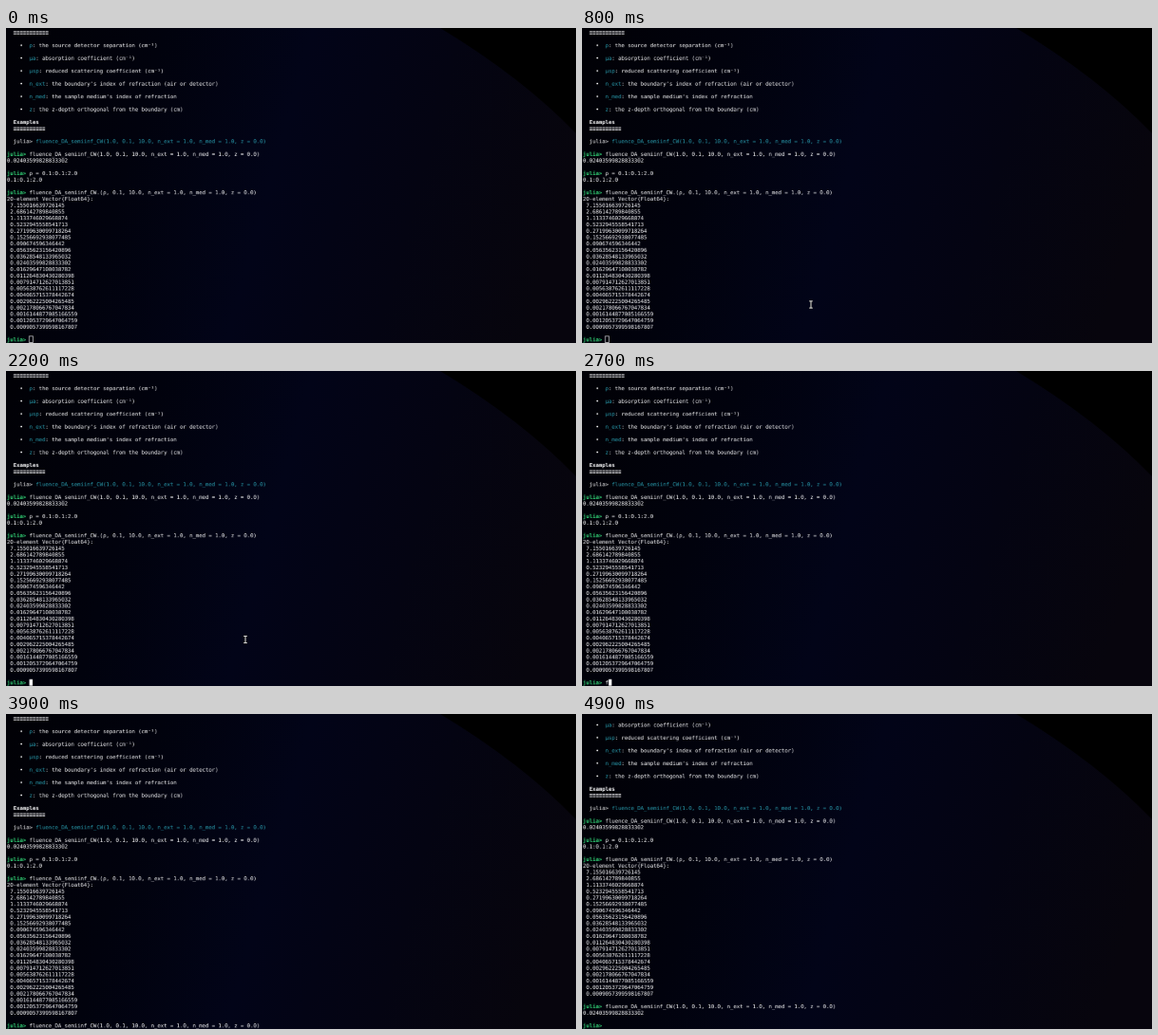
Animation of 600x332 px, one loop 5000 ms. Source, as an HTML page with a canvas:

```html
<!DOCTYPE html>
<html lang="en">
<head>
<meta charset="utf-8">
<title>Julia terminal</title>
<style>
  html, body { margin: 0; width: 100%; height: 100%; overflow: hidden; background: #000; }
  canvas { display: block; }
</style>
</head>
<body>
<canvas id="stage" width="600" height="332"></canvas>
<script>
const stage = document.getElementById('stage').getContext('2d');
const LOOP = 5000, BLINK = 600, FOCUS = 900;
// The terminal is drawn with 8 by 16 cells and then scaled down.
const COL = 8, ROW = 16, BASELINE = 13.2, ZOOM = 0.4214, LEFT = 1, TOP = 1.3;
const SIZE = 13.29, FAMILY = '"DejaVu Sans Mono", monospace';
const WHITE = '#fff', CYAN = '#2aa1b3', GREEN = '#33da7a', DARK = '#03050f';

const screen = document.createElement('canvas');
screen.width = Math.ceil(stage.canvas.width / ZOOM);
screen.height = Math.ceil(stage.canvas.height / ZOOM);
const term = screen.getContext('2d');

// Photon fluence at distance rho on a semi-infinite medium (diffusion approximation).
function fluence(rho, absorption = 0.1, scattering = 10) {
  const D = 1 / (3 * scattering), decay = Math.sqrt(3 * absorption * scattering);
  const depth = 1 / scattering, boundary = 2 * D;
  const source = z => {
    const r = Math.sqrt(rho * rho + z * z);
    return Math.exp(-decay * r) / r;
  };
  return (source(depth) - source(2 * boundary + depth)) / (4 * Math.PI * D);
}

// A line is a list of [text, colour, bold] runs.
const plain = text => [[text, WHITE]];
const bold = text => [[text, WHITE, true]];
const prompt = (code = '') => [['julia> ', GREEN, true], [code, WHITE]];
const item = (name, text) => [['    •  ', WHITE], [name, CYAN], [': ' + text, WHITE]];
const blank = plain('');

const args = '0.1, 10.0, n_ext = 1.0, n_med = 1.0, z = 0.0)';
const single = 'fluence_DA_semiinf_CW(1.0, ' + args;
const dotted = 'fluence_DA_semiinf_CW.(ρ, ' + args;
const result = plain(String(fluence(1)));
const values = Array.from({ length: 20 }, (_, i) => plain(' ' + fluence((i + 1) / 10)));

const history = [
  bold('  ' + '≡'.repeat(11)), blank,
  item('ρ', 'the source detector separation (cm⁻¹)'), blank,
  item('μa', 'absorption coefficient (cm⁻¹)'), blank,
  item('μsp', 'reduced scattering coefficient (cm⁻¹)'), blank,
  item('n_ext', "the boundary's index of refraction (air or detector)"), blank,
  item('n_med', "the sample medium's index of refraction"), blank,
  item('z', 'the z-depth orthogonal from the boundary (cm)'), blank,
  bold('  Examples'), bold('  ' + '≡'.repeat(10)), blank,
  [['  julia> ', WHITE], [single, CYAN]], blank,
  prompt(single), result, blank,
  prompt('ρ = 0.1:0.1:2.0'), plain('0.1:0.1:2.0'), blank,
  prompt(dotted), plain('20-element Vector{Float64}:'), ...values, blank
];
const finished = [...history.slice(3), prompt(single), result, blank];

// Each key press (or the focus click) restarts the caret blink.
const steps = [
  { at: 0, input: '', caret: 0 },
  { at: FOCUS, input: '', caret: 0 },
  { at: 2400, input: 'f', caret: 1 },
  { at: 2900, input: dotted, caret: 1 },
  { at: 3300, input: single, caret: 1 },
  { at: 4100, input: '', caret: 0, done: true }
];

function drawText(text, col, row, colour, isBold) {
  term.font = `${isBold ? 'bold ' : ''}${SIZE}px ${FAMILY}`;
  term.fillStyle = colour;
  term.fillText(text, col * COL, row * ROW + BASELINE);
}

function drawLine(runs, row) {
  let col = 0;
  for (const [text, colour, isBold] of runs) {
    drawText(text, col, row, colour, isBold);
    col += text.length;
  }
}

function drawCaret(time, step, row) {
  const col = 7 + step.caret, x = col * COL, y = row * ROW;
  if (time < FOCUS) {
    term.strokeStyle = WHITE;
    term.lineWidth = 1.4;
    term.strokeRect(x - 0.3, y - 0.3, COL + 1, ROW);
  } else if (Math.floor((time - step.at) / BLINK) % 2 === 0) {
    term.fillStyle = WHITE;
    term.fillRect(x, y, COL, ROW);
    drawText(step.input[step.caret] || '', col, row, DARK);
  }
}

function fillShape(path, ...colours) {
  const gradient = stage.createLinearGradient(0, 40, 580, 200);
  colours.forEach((c, i) => gradient.addColorStop(i / (colours.length - 1), c));
  stage.fillStyle = gradient;
  stage.fill(new Path2D(path));
}

function drawWallpaper() {
  fillShape('M0 0H600V332H0Z', '#010106', '#01020d', '#020418', '#040412', '#07050d');
  fillShape('M457 0Q543 52 600 111V0Z', '#000', '#000');
}

function ease(time, from, to) {
  const k = Math.min(1, Math.max(0, (time - from) / (to - from)));
  return k * k * (3 - 2 * k);
}

function drawPointer(time) {
  if (time < 300 || time >= 2400) return;
  const enter = ease(time, 300, 700), drift = ease(time, 1100, 1800);
  stage.save();
  stage.translate(354 - 113 * enter + 11 * drift, 326 - 34.5 * enter - 8.5 * drift);
  const beam = new Path2D('M-1.8 -3.6H1.8M0 -3.6V3.6M-1.8 3.6H1.8');
  for (const [colour, width] of [['#000', 2], ['#e8e8e8', 1]]) {
    stage.strokeStyle = colour;
    stage.lineWidth = width;
    stage.stroke(beam);
  }
  stage.restore();
}

function draw(now) {
  const time = Math.floor(now % LOOP / 100) * 100;
  const step = steps.findLast(s => s.at <= time);
  const lines = [...(step.done ? finished : history), prompt(step.input)];

  term.setTransform(1, 0, 0, 1, 0, 0);
  term.clearRect(0, 0, screen.width, screen.height);
  term.translate(LEFT / ZOOM, TOP / ZOOM);
  term.textRendering = 'geometricPrecision';
  lines.forEach(drawLine);
  drawCaret(time, step, lines.length - 1);

  drawWallpaper();
  stage.imageSmoothingQuality = 'high';
  stage.drawImage(screen, 0, 0, screen.width * ZOOM, screen.height * ZOOM);
  drawPointer(time);
  requestAnimationFrame(draw);
}
requestAnimationFrame(draw);
</script>
</body>
</html>
```
